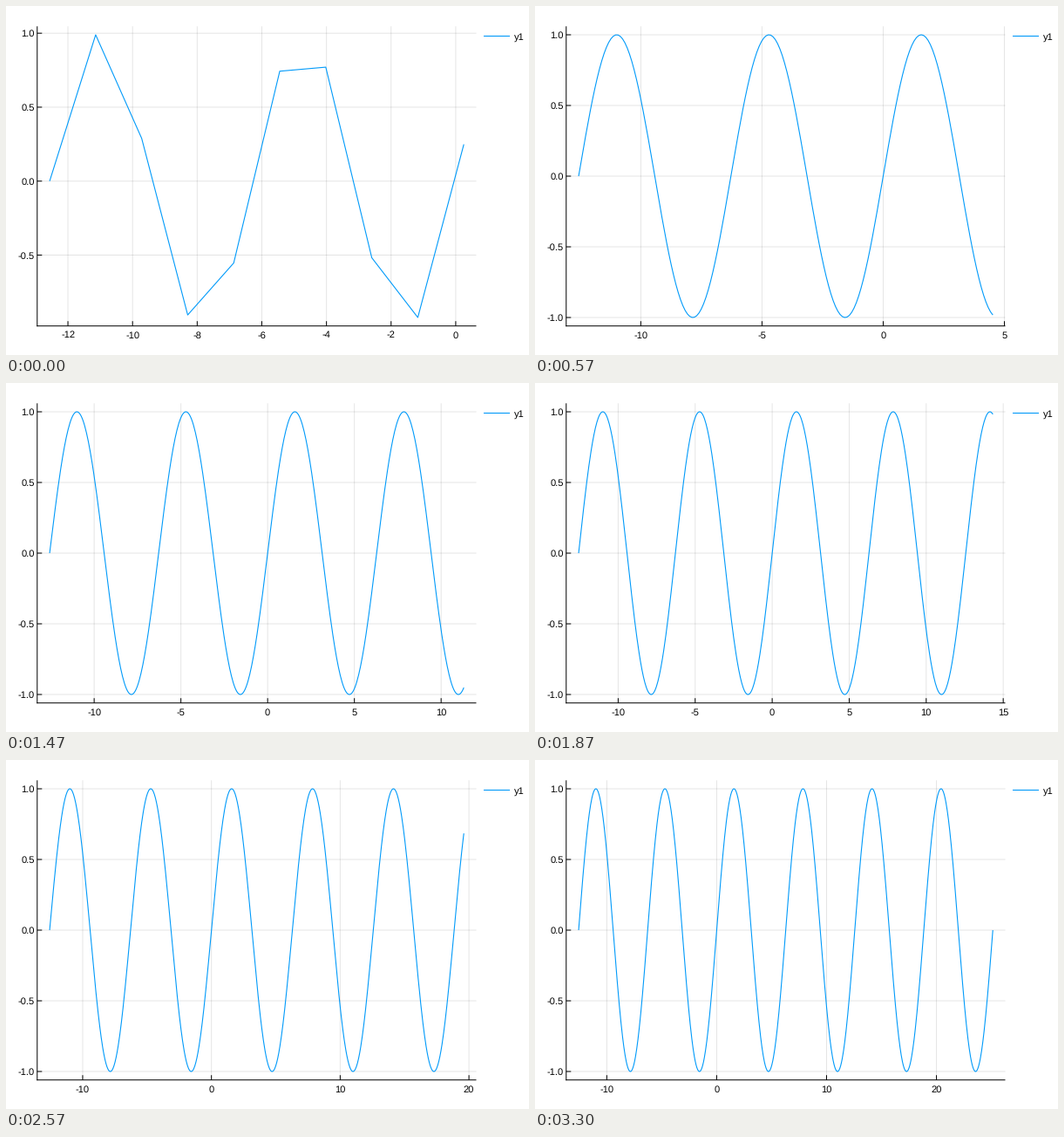
These frames come from a looping animation (600x400 px, 3330 ms). A matplotlib script:

```python
import math

import matplotlib.pyplot as plt
import numpy as np
from matplotlib.animation import FuncAnimation
from matplotlib.collections import LineCollection

W, H, DPI = 600, 400, 100
PX = 72 / DPI  # one pixel in points
STEPS, STEP_MS = 100, 100 / 3
LOOP_MS, TICK_MS = 3330, 10
LEFT, RIGHT, TOP, BOTTOM = 35.8, 539.5, 23.28, 366.72
TICK_LEN = 5.5
START, STOP = -4 * math.pi, 8 * math.pi
BLUE = "#009AFA"
NICENESS = {1: 1.0, 5: 0.9, 2: 0.7, 2.5: 0.5, 3: 0.2}

plt.rcParams["font.family"] = "Liberation Sans"
plt.rcParams["text.hinting"] = "none"
plt.rcParams["axes.unicode_minus"] = False

fig = plt.figure(figsize=(W / DPI, H / DPI), dpi=DPI, facecolor="white")
ax = fig.add_axes([0, 0, 1, 1])
ax.set(xlim=(0, W), ylim=(H, 0))
ax.axis("off")


def line_set(color, alpha=1.0, zorder=1):
    lines = LineCollection([], colors=color, linewidths=PX,
                           alpha=alpha, zorder=zorder)
    lines.set_snap(False)
    ax.add_collection(lines, autolim=False)
    return lines


def blue_line(xs, ys):
    return ax.plot(xs, ys, color=BLUE, lw=1.1 * PX, zorder=3, snap=False,
                   solid_joinstyle="round", solid_capstyle="butt")[0]


def label(x, baseline, text, ha):
    return ax.text(x, baseline, text, ha=ha, va="baseline",
                   size=11.1 * PX, color="black", zorder=4)


grid = line_set("black", alpha=0.1)
frame_lines = line_set("black", zorder=2)
curve = blue_line([], [])
blue_line([548, 578], [34.5, 34.5])
label(583, 38.6, "y1", "left")
labels = []


def widened(values):
    lo, hi = values.min(), values.max()
    pad = 0.03 * (hi - lo)
    return lo - pad, hi + pad


def best_ticks(lo, hi):
    """Choose ticks by weighing count, coverage and niceness of the step."""
    span, best = hi - lo, (-math.inf, None, None)
    for power in (-1, 0, 1):
        for base, nice in NICENESS.items():
            step = base * 10.0 ** power
            ticks = np.arange(math.ceil(lo / step),
                              math.floor(hi / step) + 1) * step
            count = len(ticks)
            if not 4 <= count <= 8:
                continue
            score = (0.25 * (1 - abs(count - 5) / 5)
                     + 0.5 * span / ((count - 1) * step) + 0.25 * nice)
            if score > best[0]:
                best = score, ticks, step
    _, ticks, step = best
    digits = 0 if step == int(step) else 1
    return [(t, f"{t + 0.0:.{digits}f}") for t in ticks]


def draw_step(n):
    """Plot the sine with ten samples per step, up to the n-th end point."""
    x = np.linspace(START, STOP * n / STEPS, 10 * n)
    y = np.sin(x)
    x_lo, x_hi = widened(x)
    y_lo, y_hi = widened(y)

    def to_px(v):
        return LEFT + (v - x_lo) / (x_hi - x_lo) * (RIGHT - LEFT)

    def to_py(v):
        return BOTTOM - (v - y_lo) / (y_hi - y_lo) * (BOTTOM - TOP)

    curve.set_data(to_px(x), to_py(y))

    while labels:
        labels.pop().remove()
    rules = []
    edges = [[(LEFT, TOP), (LEFT, BOTTOM + 0.5)],
             [(LEFT - 0.5, BOTTOM), (RIGHT, BOTTOM)]]
    for value, text in best_ticks(x_lo, x_hi):
        px = to_px(value)
        rules.append([(px, TOP), (px, BOTTOM)])
        edges.append([(px, BOTTOM), (px, BOTTOM - TICK_LEN)])
        labels.append(label(px, 380.5, text, "center"))
    for value, text in best_ticks(y_lo, y_hi):
        py = to_py(value)
        rules.append([(LEFT, py), (RIGHT, py)])
        edges.append([(LEFT, py), (LEFT + TICK_LEN, py)])
        labels.append(label(32.8, py + 4, text, "right"))
    grid.set_segments(rules)
    frame_lines.set_segments(edges)


def update(tick):
    # each step begins at its time rounded to the nearest tick
    ms = (tick + 0.5) * TICK_MS
    draw_step(min(int(ms / STEP_MS) + 1, STEPS))
    return [curve, grid, frame_lines, *labels]


anim = FuncAnimation(fig, update, frames=LOOP_MS // TICK_MS, interval=TICK_MS,
                     repeat=True, repeat_delay=0, blit=False)
plt.show()
```
